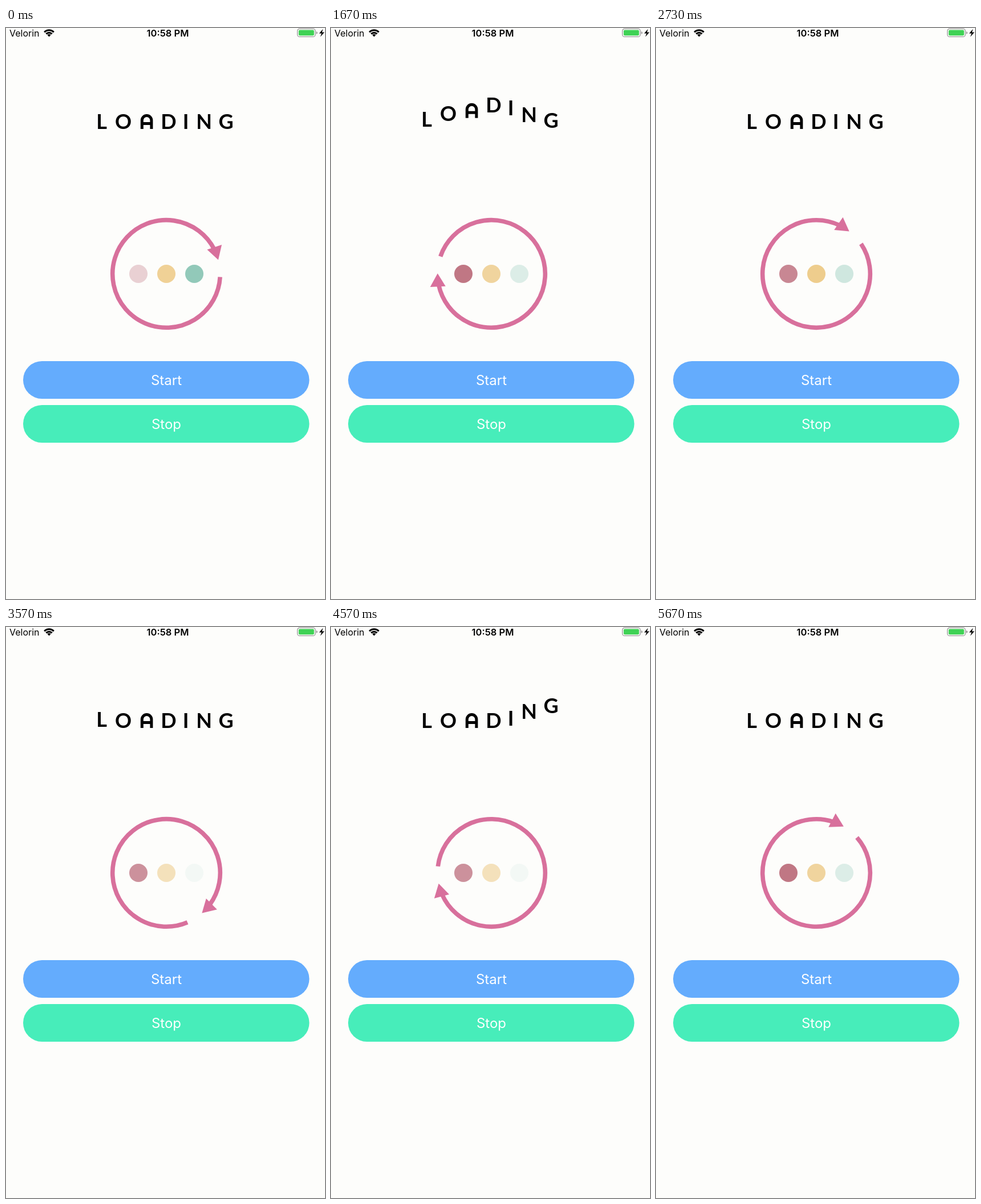
Animation of 559 by 1001 pixels, one loop 5.71 s. Source, as an HTML page:

```html
<!DOCTYPE html>
<html lang="en">
<head>
<meta charset="utf-8">
<title>Loading</title>
<style>
  html, body { margin: 0; width: 100%; height: 100%; overflow: hidden; background: #fdfdfb; }
  svg { display: block; width: 100%; height: 100%; }
  text { font-family: Inter, Roboto, sans-serif; }
  .mid { text-anchor: middle; }
  #word text { font: 700 36px Lato, "Open Sans", sans-serif; text-anchor: middle; }
  .button { font-size: 24px; fill: #fff; text-anchor: middle; }
</style>
</head>
<body>
<svg viewBox="0 0 559 1001">
  <!-- status bar -->
  <text x="6" y="15" font-size="16">Velorin</text>
  <g fill="none" stroke="#000" stroke-width="3">
    <path d="M67.2 7.2a11.8 11.8 0 0 1 16.6 0"/>
    <path d="M70.3 10.4a7.4 7.4 0 0 1 10.4 0"/>
    <path d="M72.4 12.1a4.4 4.4 0 0 1 6.2 0L75.5 15.4Z" fill="#000" stroke="none"/>
  </g>
  <text class="mid" x="283.5" y="15" font-size="16.5" font-weight="600">10:58 PM</text>
  <rect x="510.6" y="1.4" width="31.4" height="14" rx="4" fill="none" stroke="#999" stroke-width="1.3"/>
  <rect x="512.8" y="3.6" width="27" height="9.6" rx="2" fill="#3fd255"/>
  <path d="M543.6 6q2.2 .5 2.2 2.4t-2.2 2.4Z" fill="#999"/>
  <path d="M555.4 1.8L548.8 9.4H553L550.8 15.6L558 7.4H553.8Z"/>

  <g id="word" role="img" aria-label="LOADING">
    <text x="167.5" y="177">L</text>
    <text x="205.5" y="177">O</text>
    <path d="M238.3 177V161.8a8.3 8.3 0 0 1 16.6 0V177M238.3 167.5H254.9" fill="none" stroke="#000" stroke-width="5"/>
    <text x="285" y="177">D</text>
    <text x="315" y="177">I</text>
    <text x="347" y="177">N</text>
    <text x="385.5" y="177">G</text>
  </g>

  <g id="arrow">
    <path id="ring" fill="none" stroke="#d8709c" stroke-width="7.6"/>
    <path d="M94.2 0L80 -22.4L107 -24Z" fill="#d8709c"/>
  </g>
  <g id="dots">
    <circle cx="232" cy="431" r="16" fill="#c07684"/>
    <circle cx="281" cy="431" r="16" fill="#e9bd6a"/>
    <circle cx="330" cy="431" r="16" fill="#8bc6b5"/>
  </g>

  <rect x="30" y="584" width="501.5" height="66" rx="33" fill="#64acfd"/>
  <text class="button" x="281" y="626">Start</text>
  <rect x="30" y="661" width="501.5" height="66" rx="33" fill="#47edba"/>
  <text class="button" x="281" y="703">Stop</text>
</svg>
<script>
const LOOP = 5710;
const byId = id => document.getElementById(id);
const letters = [...byId('word').children];
const dots = [...byId('dots').children];

const RADIUS = 94.3;
const onRing = degrees => {
  const a = degrees * Math.PI / 180;
  return `${RADIUS * Math.cos(a)} ${RADIUS * Math.sin(a)}`;
};
byId('ring').setAttribute('d', `M${onRing(18.4)}A${RADIUS} ${RADIUS} 0 1 1 ${onRing(-12)}`);

// Letters hop one after another, twice per loop.
const HOP_STARTS = [1005, 3515];
const HOP_DELAYS = [0, 100, 140, 300, 400, 500, 600];
const HOP_TIME = 750;
const HOP_HEIGHT = 29.5;

function hop(time) {
  if (time <= 0 || time >= HOP_TIME) return 0;
  return HOP_HEIGHT * (1 - Math.cos(2 * Math.PI * time / HOP_TIME)) / 2;
}

// Fades between 0 and 1 and back every second.
function pulse(time) {
  const phase = ((time % 1000) + 1000) % 1000;
  return Math.abs(1 - phase / 500);
}

function draw(t) {
  letters.forEach((letter, i) => {
    const lift = HOP_STARTS.reduce((sum, start) => sum + hop(t - start - HOP_DELAYS[i]), 0);
    letter.setAttribute('transform', `translate(0 ${-lift})`);
  });

  // The spinner runs slightly ahead at the start of the loop.
  const spin = t + 40 * Math.max(0, 1 - t / 870);
  byId('arrow').setAttribute('transform', `translate(281 431) rotate(${spin * 0.12 - 20})`);

  dots.forEach((dot, i) => dot.setAttribute('opacity', pulse(t - 670 - 180 * i)));
}

function tick() {
  draw(performance.now() % LOOP);
  requestAnimationFrame(tick);
}
tick();
</script>
</body>
</html>
```
